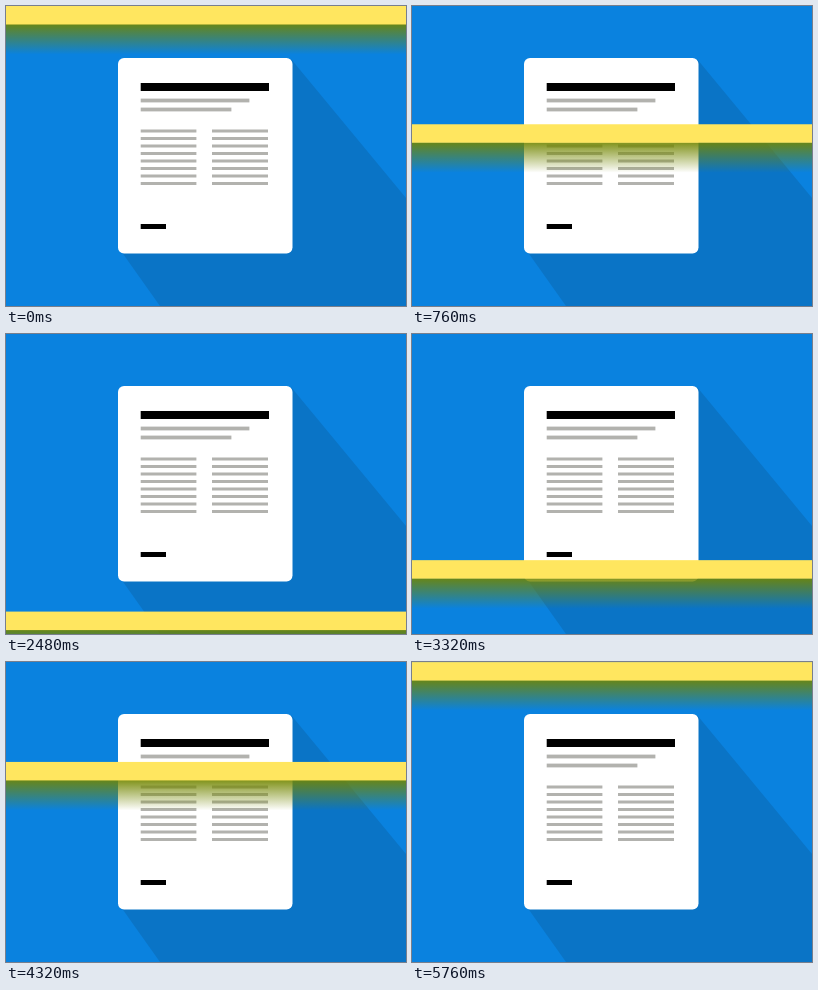
Write an HTML page that moves like this. It is 400x300 px and loops after 5800 ms.

```html
<!DOCTYPE html>
<html lang="en">
<head>
<meta charset="utf-8">
<title>Document scan</title>
<style>
html, body { margin: 0; width: 100%; height: 100%; overflow: hidden; background: #0a82df; }
svg { display: block; width: 100%; height: 100%; }
</style>
</head>
<body>
<svg viewBox="0 0 400 300" xmlns="http://www.w3.org/2000/svg">
  <defs>
    <linearGradient id="glow" x1="0" y1="0" x2="0" y2="1">
      <stop offset="0" stop-color="#728600" stop-opacity=".9"/>
      <stop offset="1" stop-color="#728600" stop-opacity="0"/>
    </linearGradient>
  </defs>
  <rect width="400" height="300" fill="#0a82df"/>
  <path d="M285 53L400 192V300H154L115 245Z" fill="#0a74c6"/>
  <rect x="112" y="52" width="174.5" height="195.5" rx="6" fill="#fff"/>
  <g id="lines"></g>
  <g id="scanner">
    <rect y="18" width="400" height="30.5" fill="url(#glow)"/>
    <rect width="400" height="18.5" fill="#ffe65f"/>
  </g>
</svg>
<script>
const LOOP = 5800;
const GREY = '#b2b2ae';
const lines = document.getElementById('lines');
const scanner = document.getElementById('scanner');

function addLine(x, y, width, height, fill) {
  const rect = document.createElementNS('http://www.w3.org/2000/svg', 'rect');
  Object.entries({ x, y, width, height, fill }).forEach(([k, v]) => rect.setAttribute(k, v));
  lines.append(rect);
}

addLine(134.7, 77, 128.3, 8, '#000');
addLine(134.7, 92.6, 108.7, 3.8, GREY);
addLine(134.7, 101.6, 90.7, 3.8, GREY);
for (let row = 0; row < 8; row++) {
  const y = 123.5 + row * 7.5;
  addLine(134.7, y, 55.7, 3, GREY);
  addLine(206, y, 56, 3, GREY);
}
addLine(134.7, 218, 25.3, 5, '#000');

// Scanner path: time (ms), top edge (px), speed (px/ms)
const path = [
  [0, 0, 0],
  [600, 78.5, .235],
  [760, 118, .258],
  [1200, 228.2, .17],
  [1360, 248, .1],
  [1800, 275.4, .01],
  [2460, 277.6, 0],
  [3000, 260.4, -.08],
  [3600, 190.4, -.125],
  [3920, 150.5, -.126],
  [4200, 115.4, -.126],
  [4760, 45.4, -.112],
  [5400, 7.4, -.03],
  [LOOP, 0, 0]
];

// Cubic Hermite interpolation along the path
function scannerTop(time) {
  const i = path.findIndex(key => key[0] > time);
  const [t0, y0, v0] = path[i - 1];
  const [t1, y1, v1] = path[i];
  const span = t1 - t0;
  const s = (time - t0) / span;
  const ease = s * s * (3 - 2 * s);
  return y0 + (y1 - y0) * ease
    + span * s * (1 - s) * (v0 * (1 - s) - v1 * s);
}

const start = performance.now();

function draw() {
  const time = (performance.now() - start) % LOOP;
  scanner.setAttribute('transform', `translate(0 ${scannerTop(time).toFixed(2)})`);
  requestAnimationFrame(draw);
}

draw();
</script>
</body>
</html>
```
